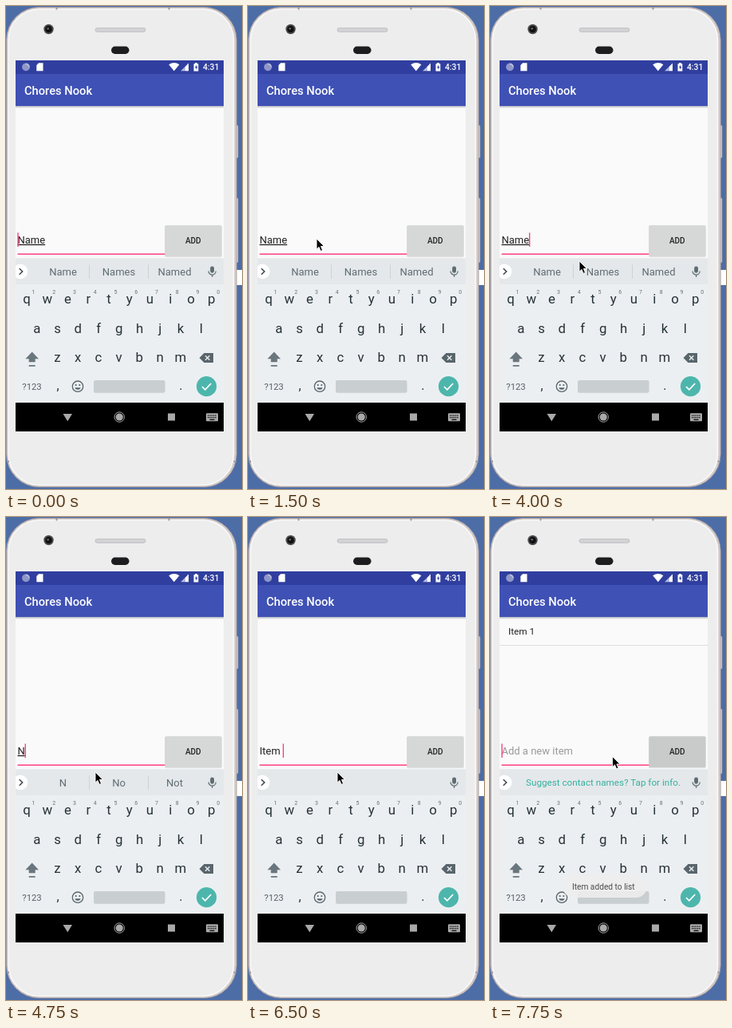
Write an HTML page that moves like this. It is 296 px wide and 604 px high and loops after 8000 ms.

```html
<!DOCTYPE html>
<html lang="en">
<head>
<meta charset="utf-8">
<title>Todo list demo</title>
<style>
  html, body { margin: 0; width: 100%; height: 100%; overflow: hidden; background: #4d6da7; }
  svg { display: block; width: 296px; height: 604px; }
  text { font-family: Roboto, sans-serif; white-space: pre; }
  .mid { text-anchor: middle; }
  .medium { font-weight: 500; }
</style>
</head>
<body>
<svg viewBox="0 0 296 604">
  <defs>
    <linearGradient id="shadow" x2="0" y2="1">
      <stop stop-color="#b4b6bd"/><stop offset="1" stop-color="#fafafa"/>
    </linearGradient>
    <clipPath id="screen"><rect x="12" y="68" width="261" height="464"/></clipPath>
  </defs>

  <!-- phone body -->
  <rect width="296" height="604" fill="#4d6da7"/>
  <rect x="287" y="330" width="9" height="19" fill="#fff"/>
  <g fill="#d9d3d2" stroke="#a9a3a5" stroke-width=".6">
    <rect x="286" y="149" width="5" height="41" rx="1.5"/>
    <rect x="286" y="240" width="5" height="81" rx="1.5"/>
  </g>
  <rect x=".6" y="1.500" width="288.600" height="600" rx="41" fill="#d3cac8" stroke="#a89e9e" stroke-width=".8"/>
  <rect x="3.200" y="4" width="282.300" height="595" rx="38.500" fill="#ededee" stroke="#fafafa" stroke-width="1.600"/>
  <path d="M63.500 1.500v3M204.500 1.500v3M1 569.500h3M285.500 569.500h3.500" stroke="#9c9697" stroke-width="2"/>
  <circle cx="53.500" cy="29" r="6.200" fill="#4a4a4c"/>
  <circle cx="53.500" cy="29" r="4.300" fill="#111"/>
  <circle cx="52.700" cy="28.200" r="1.300" fill="#666a72"/>
  <rect x="112" y="27.500" width="63" height="4.800" rx="2.400" fill="#d3d3d5" stroke="#b9b9bc" stroke-width=".8"/>
  <rect x="132" y="50.500" width="22.500" height="9.500" rx="4.700" fill="#1d1d1f"/>

  <g clip-path="url(#screen)">
    <!-- status bar and toolbar -->
    <rect x="12" y="68" width="261" height="464" fill="#fafafa"/>
    <rect x="12" y="68" width="261" height="17" fill="#303f9f"/>
    <rect x="12" y="85" width="261" height="40" fill="#3f51b5"/>
    <rect x="12" y="125" width="261" height="3" fill="url(#shadow)"/>
    <circle cx="25" cy="76.300" r="4.900" fill="#8e97c8"/>
    <path d="M25 72.500a3.800 3.800 0 0 1 3.800 3.800" fill="none" stroke="#c3c8e3" stroke-width="1.300"/>
    <g fill="#fff">
      <path d="M41 71.300h5.500v10H38.300V74z"/>
      <path d="M204.200 73.200q6.700-4.600 13.200 0L210.800 81.300z"/>
      <path d="M229 71.400v9.900h-4.500v-5.400z"/>
      <path d="M224.500 75.900v5.400h-5.400z" opacity=".65"/>
      <path d="M235.500 72.300h1.600v-1.200h2.600v1.200h1.600v9.200h-5.800z"/>
      <text x="247" y="80" font-size="10.300" class="medium">4:31</text>
      <text x="23" y="111" font-size="14.700" class="medium">Chores Nook</text>
    </g>
    <path d="M239 73.500l-2 3.700h1.300v2.500l2-3.700H239z" fill="#303f9f"/>

    <!-- list -->
    <g id="listItem">
      <text x="23" y="147" font-size="11.800" fill="#222">Item 1</text>
      <path d="M12 160.500h261" stroke="#dedede"/>
    </g>

    <!-- input row -->
    <rect x="199" y="274.500" width="71.800" height="39.700" rx="2" fill="#e0e0e0"/>
    <rect id="button" x="199.300" y="274.300" width="71.200" height="38.700" rx="1.500"/>
    <text x="234.800" y="297" font-size="10" class="mid medium" fill="#222">ADD</text>
    <path d="M14.500 310.200H199.300" stroke="#ff4081" stroke-width="1.500"/>
    <text id="field" x="14.500" y="296.900" font-size="13"/>
    <rect id="caret" y="283.500" width="1.400" height="17.500" fill="#ff4081"/>

    <!-- keyboard -->
    <rect x="12" y="315.500" width="261" height="182" fill="#eceff1"/>
    <rect x="12" y="315.500" width="261" height="32.500" fill="#e4e8eb"/>
    <circle cx="18" cy="332" r="9.300" fill="#fff"/>
    <path d="M16.700 328.200l4 3.800-4 3.800" fill="none" stroke="#37474f" stroke-width="1.500"/>
    <g stroke="#5f6c72" fill="none" stroke-width="1.200">
      <rect x="256.800" y="326" width="3.600" height="7.200" rx="1.800" fill="#5f6c72"/>
      <path d="M254 331.500a4.600 4.600 0 0 0 9.200 0M258.600 336v3"/>
    </g>
    <g id="words" font-size="13" fill="#606c72" class="mid">
      <path d="M104.500 323.500v17.500M178.500 323.500v17.500" stroke="#ccd2d5"/>
      <text x="71.500" y="337"/><text x="141.500" y="337"/><text x="211.500" y="337"/>
    </g>
    <text id="tip" x="45" y="336" font-size="11.700" fill="#35b09f">Suggest contact names? Tap for info.</text>
    <g id="keys" class="mid" fill="#263238"></g>
    <g fill="#58656c">
      <path d="M32.700 432.500l8.300 8.800h-4.300v4h-8v-4h-4.300zM28.700 449h8v1.800h-8z" fill="#69767d"/>
      <path d="M248.500 434h11.500v12H248.500l-6-6z"/>
      <path d="M250 437.300l5.400 5.400m0-5.400l-5.400 5.400" stroke="#eceff1" stroke-width="1.400"/>
      <circle cx="90" cy="475.700" r="6.700" fill="none" stroke="#58656c" stroke-width="1.300"/>
      <circle cx="87.700" cy="474" r="1.100"/><circle cx="92.300" cy="474" r="1.100"/>
      <path d="M86.300 477.200h7.400a3.800 3.300 0 0 1-7.400 0z"/>
    </g>
    <rect x="110" y="468" width="89.500" height="15.700" rx="2" fill="#c9ced1"/>
    <circle cx="251.500" cy="475.700" r="12.600" fill="#4db6ac"/>
    <path d="M246 476l3.800 3.800 7.400-7.800" fill="none" stroke="#fff" stroke-width="1.700"/>

    <!-- navigation bar -->
    <rect x="12" y="496" width="261" height="36" fill="#000"/>
    <g fill="#a9a9a9">
      <path d="M71.500 510h11.500l-5.700 9.300z"/>
      <circle cx="142.200" cy="514" r="4.600"/>
      <circle cx="142.200" cy="514" r="6.200" fill="none" stroke="#a9a9a9"/>
      <rect x="203" y="509.500" width="9" height="9"/>
      <rect x="251" y="509.300" width="15" height="10" rx="1"/>
      <path d="M253 512.200h11M253 514.700h11" stroke="#000" stroke-width="1.200" stroke-dasharray="1.300 1"/>
      <path d="M255.500 517.300h6" stroke="#000" stroke-width="1.200"/>
    </g>

    <g id="toast">
      <rect x="91" y="448" width="106" height="28" rx="14" fill="#f0eef0" opacity=".88"/>
      <text x="142.300" y="465.800" font-size="10.200" class="mid" fill="#4c4c4c">Item added to list</text>
    </g>
  </g>

  <path id="pointer" d="M0 0V13.200L3 10.400 5.100 15.400 7.500 14.400 5.400 9.500H9.500Z" fill="#000" stroke="#fff" stroke-width=".9"/>
</svg>
<script>
const LOOP = 8000;
const $ = id => document.getElementById(id);
const NS = 'http://www.w3.org/2000/svg';

function addKey(label, x, y, size, fill) {
  const key = document.createElementNS(NS, 'text');
  key.textContent = label;
  key.setAttribute('x', x);
  key.setAttribute('y', y);
  key.setAttribute('font-size', size);
  if (fill) key.setAttribute('fill', fill);
  $('keys').append(key);
}

[['qwertyuiop', 26, 372], ['asdfghjkl', 38.8, 408.5], ['zxcvbnm', 64.3, 445.3]].forEach(([row, x0, y], r) =>
  [...row].forEach((letter, i) => {
    const x = x0 + i * 25.75;
    addKey(letter, x, y, 16.8);
    if (r === 0) addKey((i + 1) % 10, x + 8.5, 360, 7, '#65727a');
  }));
addKey('?123', 32.5, 480, 11.3, '#546067');
addKey(',', 65, 480, 16);
addKey('.', 219.3, 480, 16);

// Each step changes only the listed properties; caret is a letter index, -1 hides it.
const steps = [
  [0, { text: 'Name', marked: true, words: 'Name Names Named', caret: 0, pointer: null,
        added: false, toast: false, button: '#d6d7d7' }],
  [500, { caret: -1, pointer: [279, 586] }],
  [750, { pointer: [192, 452] }],
  [1000, { caret: 0, pointer: [122, 345] }],
  [1250, { pointer: [93, 300] }],
  [1500, { caret: -1, pointer: [86, 291] }],
  [1750, { pointer: [46, 292] }],
  [2000, { caret: 0, pointer: [5, 292] }],
  [2250, { pointer: [20, 292] }],
  [2500, { caret: -1, pointer: [66, 291] }],
  [3000, { caret: 0, pointer: [112, 319] }],
  [3500, { caret: 2 }],
  [3750, { caret: 3 }],
  [4000, { caret: 4 }],
  [4500, { text: 'Nam', caret: 3, words: 'Nam Name Names' }],
  [4750, { text: 'N', caret: 1, words: 'N No Not' }],
  [5000, { text: '', caret: 0, words: '' }],
  [5500, { caret: -1 }],
  [6000, { text: 'Ite', caret: 3, words: "Ite It's Items" }],
  [6250, { text: 'Item', caret: 4, words: 'Item Items Itemized' }],
  [6500, { text: 'Item ', caret: 5, marked: false, words: '' }],
  [6750, { text: 'Item 1', caret: 6, pointer: [140, 328] }],
  [7000, { pointer: [206, 312] }],
  [7250, { caret: -1, pointer: [247, 287] }],
  [7500, { text: '', caret: 0, added: true, button: '#c9cbca', pointer: [225, 291] }],
  [7750, { toast: true, pointer: [153.5, 299.5] }]
];
let state = {};
const states = steps.map(([time, change]) => ({ time, ...(state = { ...state, ...change }) }));

const show = (id, visible) => $(id).setAttribute('visibility', visible ? 'visible' : 'hidden');

function draw(s) {
  const field = $('field');
  field.textContent = s.text || 'Add a new item';
  field.setAttribute('fill', s.text ? '#222' : '#999');
  field.style.textDecoration = s.text && s.marked ? 'underline' : 'none';

  show('caret', s.caret >= 0);
  const offset = s.caret > 0 ? field.getSubStringLength(0, s.caret) : 0;
  $('caret').setAttribute('x', 14.3 + offset);

  show('words', s.words);
  const words = s.words.split(' ');
  $('words').querySelectorAll('text').forEach((el, i) => el.textContent = words[i] || '');

  show('listItem', s.added);
  show('tip', s.added);
  show('toast', s.toast);
  $('button').setAttribute('fill', s.button);

  show('pointer', s.pointer);
  if (s.pointer) $('pointer').setAttribute('transform', `translate(${s.pointer})`);
}

const start = performance.now();
let current;
function tick() {
  const t = (performance.now() - start) % LOOP;
  const next = states.findLast(s => s.time <= t) || states[0];
  if (next !== current) draw(current = next);
  requestAnimationFrame(tick);
}
tick();
</script>
</body>
</html>
```
